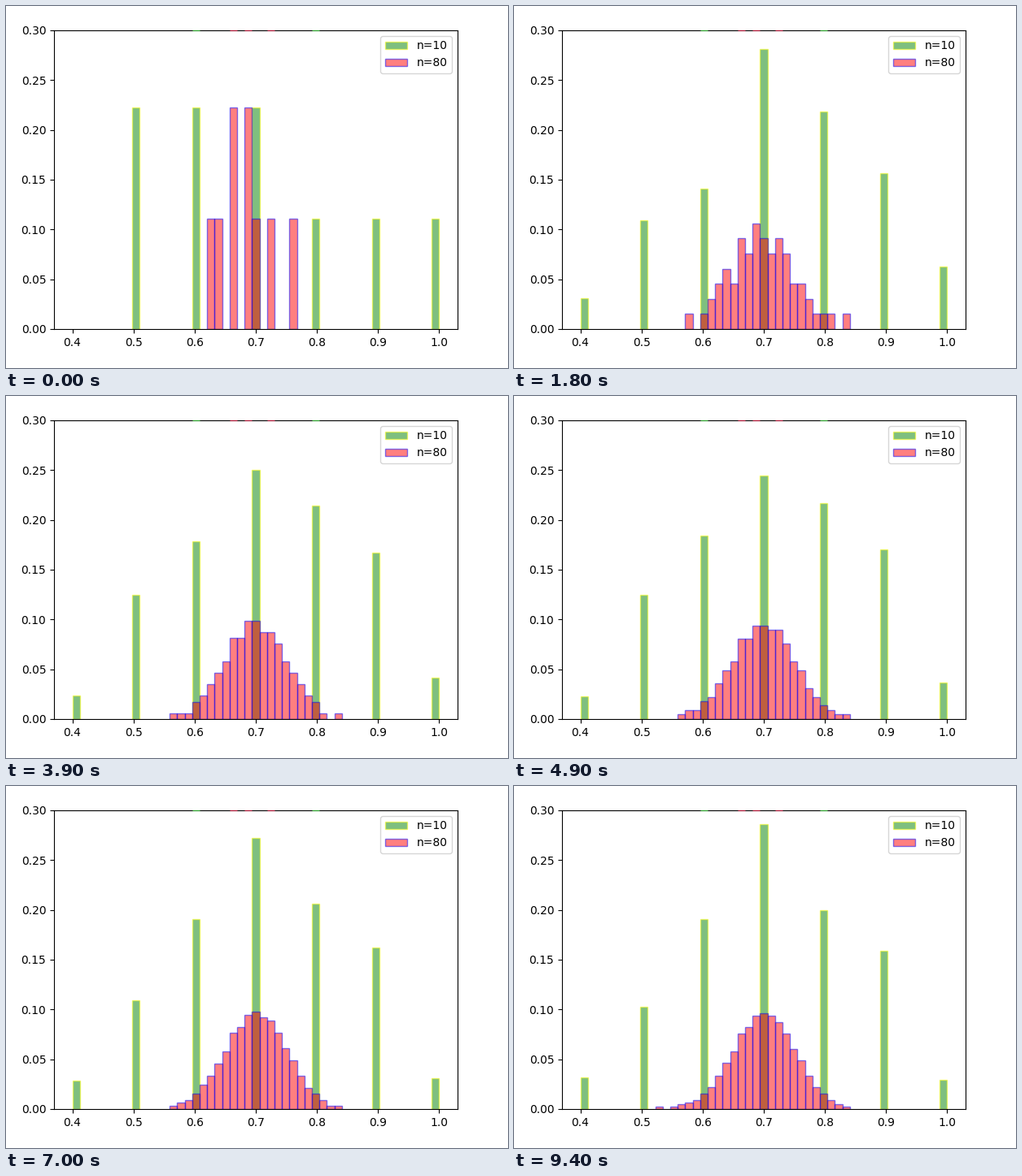
Animation, 617 px wide and 446 px high, one loop 9500 ms. Source, as a matplotlib script:

```python
from math import comb

import numpy as np
import matplotlib.pyplot as plt
from matplotlib.animation import FuncAnimation

W, H, DPI = 617, 446, 100
FRAMES, STEP_MS = 95, 100
CHANCE = 0.7
EDGES = np.linspace(0.4, 1.0, 50)
BINS = len(EDGES) - 1
WIDTH = EDGES[1] - EDGES[0]

rng = np.random.default_rng(4)

# Ten trials only reach every eighth bin; counts at a few sample sizes.
SMALL_KEYS = {
    9: (0, 2, 2, 2, 1, 1, 1),
    65: (2, 7, 9, 18, 14, 10, 4),
    220: (5, 27, 40, 53, 47, 37, 8),
    445: (14, 45, 84, 126, 88, 70, 13),
}

# Eighty trials reach every bin: nine first draws, then a binomial bell.
FIRST_DRAWS = np.bincount([18, 19, 21, 21, 23, 23, 24, 26, 29],
                          minlength=BINS)
BELL = np.array([comb(80, m) * CHANCE**m * (1 - CHANCE)**(80 - m)
                 for m in range(32, 81)])
PHASE = rng.uniform(0.05, 0.95, BINS)


def small_counts(size):
    counts = np.zeros(BINS)
    columns = zip(*SMALL_KEYS.values())
    counts[::8] = [np.interp(size, list(SMALL_KEYS), c) for c in columns]
    return np.floor(counts + 0.5)


def large_counts(size):
    return np.floor(FIRST_DRAWS + (size - 9) * BELL + PHASE)


fig = plt.figure(figsize=(W / DPI, H / DPI), dpi=DPI, facecolor="white")
ax = fig.add_axes([59 / W, 48.08 / H, 496 / W, 368 / H])


def make_bars(face, edge, label):
    return ax.bar(EDGES[:-1], np.zeros(BINS), WIDTH, align="edge",
                  facecolor=face, edgecolor=edge, alpha=0.5, label=label)


series = [
    (small_counts, make_bars("g", "yellow", "n=10")),
    (large_counts, make_bars("r", "b", "n=80")),
]

ax.set_xlim(0.37, 1.03)
ax.set_ylim(0, 0.3)
ax.legend(loc="upper right")

# Coloured dashes on the top border.
for color, places in (("limegreen", (16, 32)), ("crimson", (21, 23, 26))):
    for i in places:
        ax.plot([EDGES[i], EDGES[i + 1]], [0.3, 0.3], color=color, alpha=0.8,
                lw=0.8, zorder=3, clip_on=False, solid_capstyle="butt")


def draw(frame):
    # One new sample per step at first, five per step later on.
    size = max(9 + frame, 5 * frame - 25)
    changed = []
    for count, bars in series:
        counts = count(size)
        for bar, share in zip(bars, counts / counts.sum()):
            bar.set_height(share)
            bar.set_visible(share > 0)
            changed.append(bar)
    return changed


anim = FuncAnimation(fig, draw, frames=FRAMES, interval=STEP_MS,
                     init_func=lambda: draw(0), repeat=True, repeat_delay=0,
                     blit=False)
plt.show()
```
